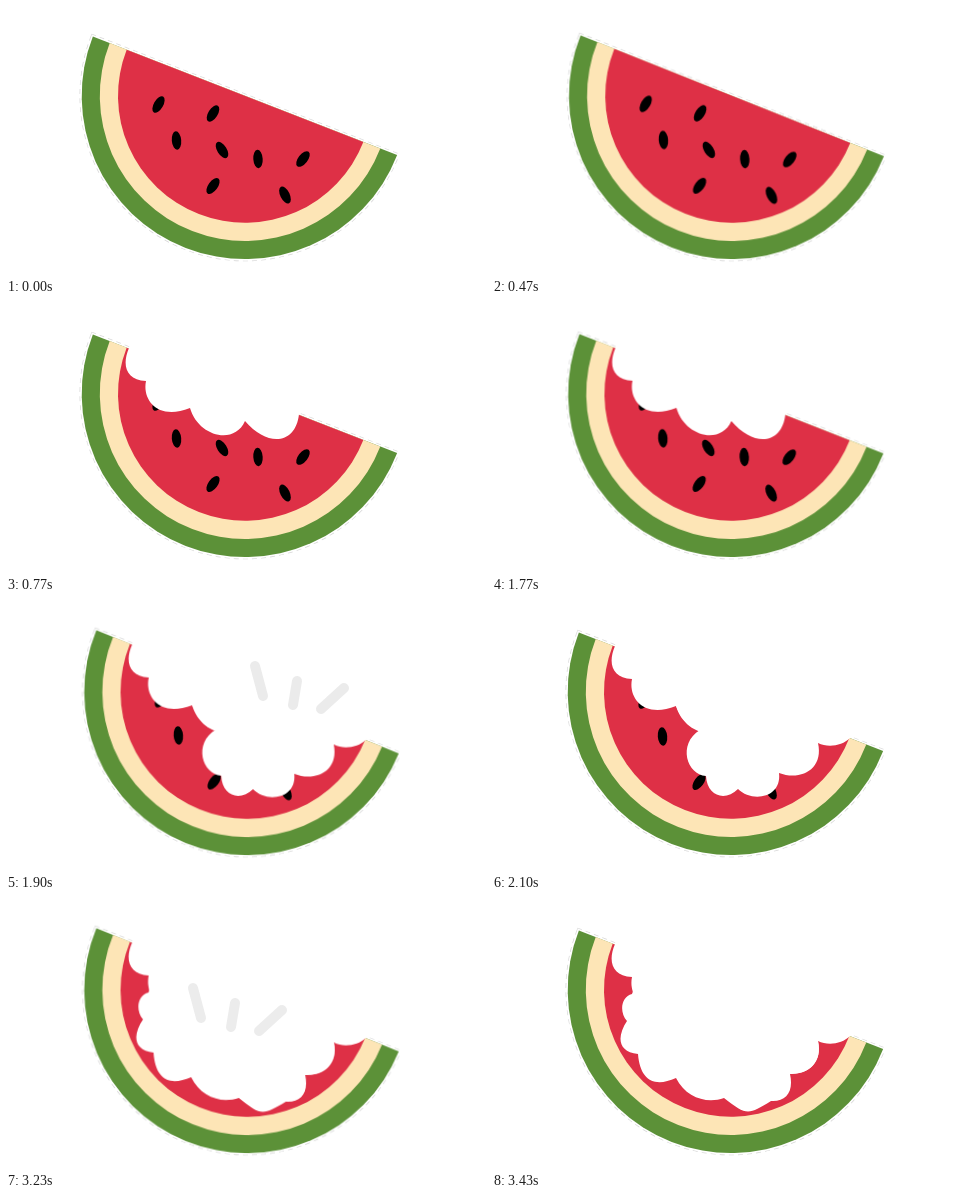
An HTML page that plays this animation: 480x270 px, repeating every 5010 ms.

```html
<!DOCTYPE html>
<html lang="en">
<head>
<meta charset="utf-8">
<title>Watermelon</title>
<style>
  html, body { margin: 0; width: 100%; height: 100%; overflow: hidden; background: #fff; }
  svg { display: block; width: 100vw; height: 100vh; }

  .slice { transform-origin: 235px 253px; animation: rock 5010ms linear infinite; }
  .bite { fill: #fff; opacity: 0; animation: 5010ms step-end infinite; }
  .b1 { animation-name: bite1; }
  .b2 { animation-name: bite2; }
  .b3 { animation-name: bite3; }
  .dash { fill: none; stroke: #e9e9e9; stroke-width: 10; stroke-linecap: round; opacity: 0; animation: 5010ms linear infinite; }
  .d1 { animation-name: dash1; }
  .d2 { animation-name: dash2; }
  .d3 { animation-name: dash3; }

  /* the slice tips to the right on each bite and settles back */
  @keyframes rock {
    0%, 8.57%, 15.36%, 35.32%, 41.91%, 61.87%, 68.46%, 100% { transform: rotate(0deg); }
    8.58%, 35.33%, 61.876% { transform: rotate(.15deg); animation-timing-function: ease-out; }
    11.97%, 38.62%, 65.17% { transform: rotate(.95deg); animation-timing-function: ease-in-out; }
  }
  @keyframes bite1 { 0% { opacity: 0; } 10.55%, 100% { opacity: 1; } }
  @keyframes bite2 { 0% { opacity: 0; } 37.3%, 100% { opacity: 1; } }
  @keyframes bite3 { 0% { opacity: 0; } 63.85%, 100% { opacity: 1; } }
  @keyframes dash1 { 0%, 10%, 15.2%, 100% { opacity: 0; } 11.4%, 12.6% { opacity: 1; } }
  @keyframes dash2 { 0%, 36.7%, 41.8%, 100% { opacity: 0; } 38.1%, 39.3% { opacity: 1; } }
  @keyframes dash3 { 0%, 63.3%, 68.3%, 100% { opacity: 0; } 64.7%, 65.9% { opacity: 1; } }
</style>
</head>
<body>
<svg viewBox="0 0 480 270">
  <defs>
    <path id="half" d="M-163.3 0A163.3 163.3 0 0 0 163.3 0Z"/>
    <ellipse id="seed" rx="4.7" ry="9.2"/>
    <path id="lines" d="M187 38L195 68M229 53L225 77M276 60L253 81"/>
  </defs>

  <g class="slice">
    <g transform="translate(239 89.8) rotate(21.3)">
      <use href="#half" fill="none" stroke="#d8d8d8" stroke-width="4.4" stroke-dasharray="5 4"/>
      <use href="#half" fill="none" stroke="#fff" stroke-width="3.2"/>
      <use href="#half" fill="#5c9138"/>
      <path d="M-145.2 0A145.2 145.2 0 0 0 145.2 0Z" fill="#fde5b6"/>
      <path d="M-127 0A127 127 0 0 0 127 0Z" fill="#de3046"/>
    </g>
    <g>
      <use href="#seed" transform="translate(152.5 98.5) rotate(30)"/>
      <use href="#seed" transform="translate(207 107.5) rotate(32)"/>
      <use href="#seed" transform="translate(170.5 134.5) rotate(-5)"/>
      <use href="#seed" transform="translate(216 144) rotate(-32)"/>
      <use href="#seed" transform="translate(252 153) rotate(-4)"/>
      <use href="#seed" transform="translate(297 153) rotate(38)"/>
      <use href="#seed" transform="translate(207 180) rotate(36)"/>
      <use href="#seed" transform="translate(279 189) rotate(-26)"/>
    </g>
    <path class="bite b1" d="M123 44C116 60 119 76 140 77C136 96 152 117 184 104C192 132 228 142 239 117C262 144 290 140 293 110L296 102L125.5 36Z"/>
    <path class="bite b2" d="M184 104C188 115 197 126 208 128C185 142 195 173 214 174C215 194 233 200 246 187C260 201 290 196 287 171C308 179 332 168 326 141C336 146 350 144 358 136L361 128L190 62Z"/>
    <path class="bite b3" d="M140 77C142 83 142 89 140 94C129 97 127 112 135 121C125 136 125 152 146 154C148 180 162 188 184 178C194 198 215 204 232 198C255 216 256 215 279 201C294 202 302 192 298 174C314 175 331 164 326 141L290 105Z"/>
  </g>

  <use class="dash d1" href="#lines"/>
  <use class="dash d2" href="#lines" x="62" y="26"/>
  <use class="dash d3" href="#lines" x="0" y="50"/>
</svg>
</body>
</html>
```
